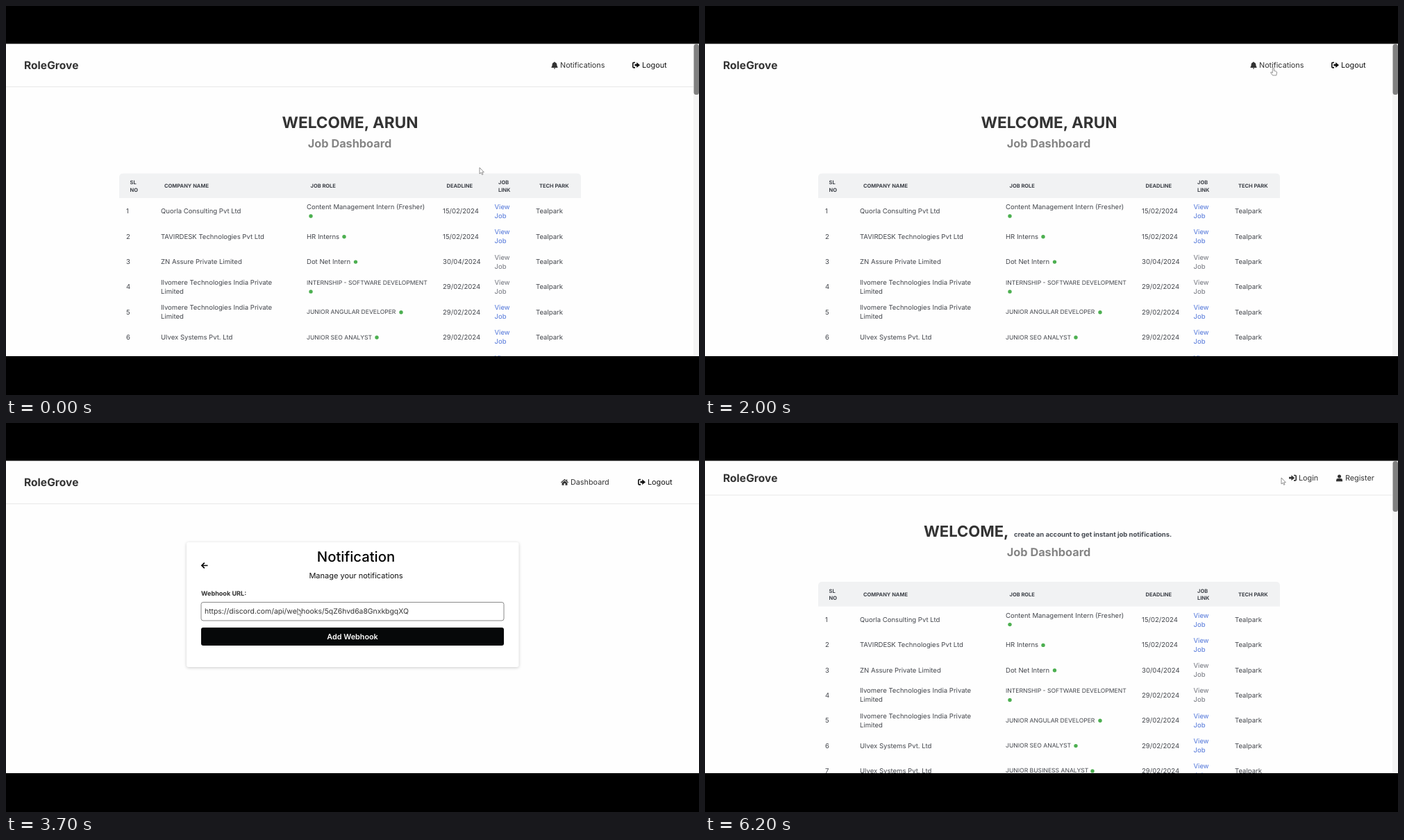
These frames come from a looping animation (998 px wide and 561 px high, 6.3 s). An HTML page:

```html
<!DOCTYPE html>
<html lang="en">
<head>
<meta charset="utf-8">
<title>Job dashboard</title>
<style>
html, body { margin: 0; width: 100%; height: 100%; overflow: hidden; background: #000; }
svg { display: block; width: 998px; height: 561px; font-family: Inter, "Open Sans", sans-serif; text-rendering: geometricPrecision; }
.card { fill: #fff; filter: drop-shadow(0 1px 2px rgba(0,0,0,.2)); }
.note { fill: #fff; filter: drop-shadow(0 0 3px rgba(0,0,0,.16)); }
</style>
</head>
<body>
<svg id="stage" viewBox="0 0 998 561" xmlns="http://www.w3.org/2000/svg"></svg>
<script>
const LOOP = 6300, STEP = 100, ROW = 36.3;
const INK = '#333', BODY = '#43464c', LINK = '#4f74d9', SEEN = '#6f727b';
const stage = document.getElementById('stage');

// text whose capitals are centred on y
const text = (x, y, s, size, fill = BODY, weight = 400, anchor = 'start') =>
  `<text x="${x}" y="${(y + size * .36).toFixed(2)}" font-size="${size}" fill="${fill}" font-weight="${weight}" text-anchor="${anchor}">${s}</text>`;
const group = (id, body, extra = '') => `<g id="${id}" ${extra}>${body}</g>`;
const rect = (x, y, w, h, fill, rx = 0, extra = '') =>
  `<rect x="${x}" y="${y}" width="${w}" height="${h}" rx="${rx}" fill="${fill}" ${extra}/>`;
const cell = (x, y, s, fill) => text(x, y, s, s === s.toUpperCase() && /[A-Z]/.test(s) ? 8.6 : 9.55, fill);
const lines = (x, y, list, fill) => list.map((s, i) => cell(x, y + (i - (list.length - 1) / 2) * 13, s, fill)).join('');

const icons = {
  bell: '<path d="M4.5 0Q5.3 0 5.3 .8Q7.9 1.4 7.9 4.3Q7.9 6.6 9 7.6V8.5H0V7.6Q1.1 6.6 1.1 4.3Q1.1 1.4 3.7 .8Q3.7 0 4.5 0ZM3.2 9H5.8Q5.6 10.3 4.5 10.3Q3.4 10.3 3.2 9Z"/>',
  out: '<path d="M4 1H2Q.8 1 .8 2.2V7.2Q.8 8.4 2 8.4H4" fill="none" stroke="currentColor" stroke-width="1.6"/><path d="M3.4 3.3H6.2V.8L11 4.7 6.2 8.6V6.1H3.4Z"/>',
  into: '<path d="M7 1H9Q10.2 1 10.2 2.2V7.2Q10.2 8.4 9 8.4H7" fill="none" stroke="currentColor" stroke-width="1.6"/><path d="M0 3.3H3.4V.8L8.2 4.7 3.4 8.6V6.1H0Z"/>',
  home: '<path d="M5.5 .3L7.9 2.4V1H9.2V3.5L11 5.1 10.3 5.9 5.5 1.8 .7 5.9 0 5.1ZM5.5 2.7L9.4 6V9.3H6.5V6.6H4.5V9.3H1.6V6Z"/>',
  user: '<circle cx="4.5" cy="2.5" r="2.5"/><path d="M0 9.8V8Q0 5.6 2.5 5.6H6.5Q9 5.6 9 8V9.8Z"/>',
  back: '<path d="M9.5 4.5H1M4.8 .6L.9 4.5 4.8 8.4" fill="none" stroke="currentColor" stroke-width="1.7"/>'
};
const icon = (name, x, y, color) =>
  `<g transform="translate(${x} ${y})" fill="${color}" color="${color}">${icons[name]}</g>`;
const navItem = ([name, x, tx, label, color, id]) => y =>
  `<g id="${id}">${icon(name, x, y - 5, color)}${text(tx, y, label, 10.8, color)}</g>`;
const header = (id, y, edge, items) => group(id,
  text(26, y, 'RoleGrove', 15.6, INK, 700) +
  group(id + 'Nav', items.map(i => navItem(i)(y)).join('')) +
  rect(0, edge, 998, 1, '#e9e9e9', 0, `id="${id}Edge"`));

// company, role, dot x, deadline
const ilvo = 'Ilvomere Technologies India Private|Limited';
const rows = [
  ['Quorla Consulting Pvt Ltd', 'Content Management Intern (Fresher)|', 439, '15/02/2024'],
  ['TAVIRDESK Technologies Pvt Ltd', 'HR Interns', 487, '15/02/2024'],
  ['ZN Assure Private Limited', 'Dot Net Intern', 503.5, '30/04/2024'],
  [ilvo, 'INTERNSHIP - SOFTWARE DEVELOPMENT|', 439, '29/02/2024'],
  [ilvo, 'JUNIOR ANGULAR DEVELOPER', 569, '29/02/2024'],
  ['Ulvex Systems Pvt. Ltd', 'JUNIOR SEO ANALYST', 534, '29/02/2024'],
  ['Ulvex Systems Pvt. Ltd', 'JUNIOR BUSINESS ANALYST', 558, '29/02/2024'],
  ['Oskarne Technologies Private Limited', 'Apprentice-Sales and Marketing', 589, '01/03/2024'],
  ['TRUVOLD IT SOLUTIONS PRIVATE LIMITED', 'Quelda XMS Manufacturing Consultant|Trainee', 475.5, '31/03/2024'],
  ['Maplewisp Technologies LLP', 'Business Development Executive -|Fresher', 475, '29/02/2024'],
  ['Maplewisp Technologies LLP', 'HR Interns', 487, '29/02/2024'],
  ['Ulvex Systems Pvt. Ltd', 'Dot Net Intern', 503.5, '29/02/2024'],
  ['Quorla Consulting Pvt Ltd', 'JUNIOR SEO ANALYST', 534, '15/03/2024'],
  [ilvo, 'JUNIOR BUSINESS ANALYST', 558, '29/02/2024'],
  ['ZN Assure Private Limited', 'HR Interns', 487, '31/03/2024'],
  ['Oskarne Technologies Private Limited', 'Dot Net Intern', 503.5, '01/03/2024']
];
const seen = [3, 4, 10];

const row = ([company, role, dot, date], i) => {
  const y = 296 + i * ROW, parts = role.split('|');
  const dotY = y + .5 + (parts.length > 1 ? 6.5 : 0);
  return cell(173, y, String(i + 1)) + lines(223, y, company.split('|')) + lines(433, y, parts) +
    `<circle cx="${dot}" cy="${dotY}" r="2.7" fill="#4caf50"/>` + cell(629, y, date) +
    lines(703.5, y, ['View', 'Job'], seen.includes(i + 1) ? SEEN : LINK) + cell(763, y, 'Tealpark');
};
const head = (x, y, s) => text(x, y, s, 7.5, '#3d4148', 700);
const table = text(495, 198.5, 'Job Dashboard', 16.3, '#858585', 700, 'middle') +
  '<path d="M163 277V247Q163 241.500 169 241.500H822Q828 241.500 828 247V277Z" fill="#f1f2f3"/>' +
  head(178.5, 254.5, 'SL') + head(178.5, 265, 'NO') + head(228, 259.5, 'COMPANY NAME') +
  head(438.5, 259.5, 'JOB ROLE') + head(634.5, 259.5, 'DEADLINE') + head(709, 254.5, 'JOB') +
  head(709, 265, 'LINK') + head(768, 259.5, 'TECH PARK') + rows.map(row).join('');

const hook = 'https://discord.com/api/';
const form = rect(260, 172, 478.5, 180, '#fff', 3, 'class="card"') +
  icon('back', 281, 201, '#000') +
  text(504, 193, 'Notification', 20.3, '#000', 500, 'middle') +
  text(504, 220.5, 'Manage your notifications', 11, '#111', 400, 'middle') +
  text(281, 246, 'Webhook URL:', 9.1, INK, 700) +
  rect(281, 258.5, 436, 26.5, '#fff', 3, 'id="field" stroke="#e3e3e3"') +
  group('hint', text(286, 271.5, 'Enter Webhook URL', 10.4, '#8b8b8b')) +
  group('typed', text(286, 271.5, hook + 'webhooks/5qZ6hvd6a8GnxkbgqXQ', 10.4, INK)) +
  rect(281, 295, 436, 26, '#060809', 3) +
  text(499, 308, 'Add Webhook', 10.8, '#fff', 600, 'middle') +
  group('note', rect(260, 375.5, 186.5, 60, '#fff', 4, 'class="note"') +
    text(432.5, 387, 'X', 11, '#f0463c', 400, 'middle') +
    text(273, 399, hook + 'webl', 11.25, '#222') + text(273, 415, '5qZ6hvd6a8GnxkbgqXQ-...', 10.8, '#222'));

const arc = (from, color) => {
  const at = a => `${(18 * Math.cos(a)).toFixed(2)} ${(18 * Math.sin(a)).toFixed(2)}`;
  return `<path d="M${at(from)}A18 18 0 0 1 ${at(from + Math.PI / 2)}" fill="none" stroke="${color}" stroke-width="5"/>`;
};

stage.innerHTML = rect(0, 54, 998, 452, '#fefefe') +
  group('dash', header('main', 85.5, 116, [
    ['bell', 785.5, 798, 'Notifications', INK, 'alerts'], ['out', 902, 916, 'Logout', '#111', 'leave']]) +
    text(495.5, 168, 'WELCOME, ARUN', 22.6, INK, 700, 'middle')) +
  group('guest', header('open', 79.5, 103.5, [
    ['into', 841, 855, 'Login', INK, 'login'], ['user', 909, 922, 'Register', INK, 'join']]) +
    group('greet', text(315, 156, 'WELCOME,', 22, INK, 700) +
      text(445, 160.5, 'create an account to get instant job notifications.', 9.5, '#454a52', 700))) +
  group('table', table) +
  group('bar', rect(990, 54, 8, 452, '#f4f4f4') + rect(990.5, 55, 7.5, 73, '#808080', 3.5, 'id="thumb"')) +
  group('manage', header('sub', 85.5, 116, [
    ['home', 799, 813, 'Dashboard', INK, 'home'], ['out', 910, 924, 'Logout', '#111', 'leave2']]) +
    group('form', form)) +
  group('shade', rect(0, 54, 998, 452, '#000', 0, 'opacity=".5"') +
    group('spin', arc(-Math.PI / 4, '#323234') + arc(Math.PI * .75, '#5b595d'))) +
  group('arrow', '<path d="M0 0V9L2.100 7.200 3.600 10.300 5 9.600 3.600 6.700H6.300Z"/>', 'fill="#fff" stroke="#777" stroke-width=".8"') +
  group('hand', '<path d="M-1.200 -5Q0 -6 1 -5V-1.500L4 -.8Q5 -.5 5 1L4.300 5H-1L-4 1Q-3.600 -.2 -2.400 .6L-1.200 1.500Z"/>', 'fill="#fff" stroke="#777" stroke-width=".8"') +
  rect(0, 0, 998, 54.5, '#000') + rect(0, 505, 998, 56, '#000');

const el = id => document.getElementById(id);
const show = (id, on) => el(id).setAttribute('display', on ? 'inline' : 'none');
const move = (id, x, y) => el(id).setAttribute('transform', `translate(${x} ${y})`);
const within = (t, a, b) => t >= a && t < b;

// keys are [time, value, value...], joined by straight lines
function track(keys, t) {
  const n = keys.findIndex(k => k[0] > t);
  if (n === 0) return keys[0].slice(1);
  if (n < 0) return keys[keys.length - 1].slice(1);
  const a = keys[n - 1], b = keys[n], p = (t - a[0]) / (b[0] - a[0]);
  return a.slice(1).map((v, i) => v + (b[i + 1] - v) * p);
}
const scrollKeys = [[200, 0], [800, 129], [1250, 300], [1500, 300], [1900, 140], [2000, 0]];
const pointerKeys = [[0, 682, 233], [800, 669.5, 222], [1500, 690, 200], [2000, 818.5, 95],
  [2500, 821, 91], [2600, 821, 91], [2900, 747, 137], [3500, 420, 268], [3800, 420, 268],
  [4000, 500, 308], [4200, 470, 425], [4900, 640, 330], [5200, 935, 84], [5500, 935, 84], [6200, 830, 79]];

function draw(t) {
  const dash = t < 2400, manage = within(t, 2400, 5400), guest = t >= 5400;
  const loaded = t >= 5800, busy = within(t, 2400, 3200);
  const [scroll] = track(scrollKeys, t), [x, y] = track(pointerKeys, t);

  show('dash', dash);
  move('dash', 0, -scroll);
  show('mainEdge', t < 1500);
  show('guest', guest);
  show('greet', loaded);
  move('openNav', loaded ? 0 : 8, 0);
  show('table', dash || loaded);
  move('table', 0, dash ? -scroll : -12.4);
  show('bar', dash || loaded);
  move('thumb', 0, dash ? scroll * 18 / 129 : 0);

  show('manage', manage);
  show('subEdge', t >= 2600);
  el('home').setAttribute('opacity', within(t, 2400, 2700) ? .6 : 1);
  show('form', manage && !busy);
  const filled = within(t, 3700, 4200);
  show('typed', filled);
  show('hint', !filled);
  el('field').setAttribute('stroke', within(t, 3600, 4100) ? '#8a8a8a' : '#e3e3e3');
  show('note', t >= 4300);
  show('shade', busy);
  el('spin').setAttribute('transform', `translate(499 280) rotate(${-75 + (t - 2500) * 121 / 400})`);

  const pointing = within(t, 2000, 2700) || within(t, 3950, 4100) || within(t, 5200, 5500);
  const visible = !within(t, 4300, 4900);
  show('hand', visible && pointing);
  show('arrow', visible && !pointing);
  move('hand', x, y);
  move('arrow', x, y);
}

const start = performance.now();
function tick() {
  const t = (performance.now() - start) % LOOP;
  draw(Math.floor(t / STEP) * STEP);
  requestAnimationFrame(tick);
}
draw(0);
requestAnimationFrame(tick);
</script>
</body>
</html>
```
